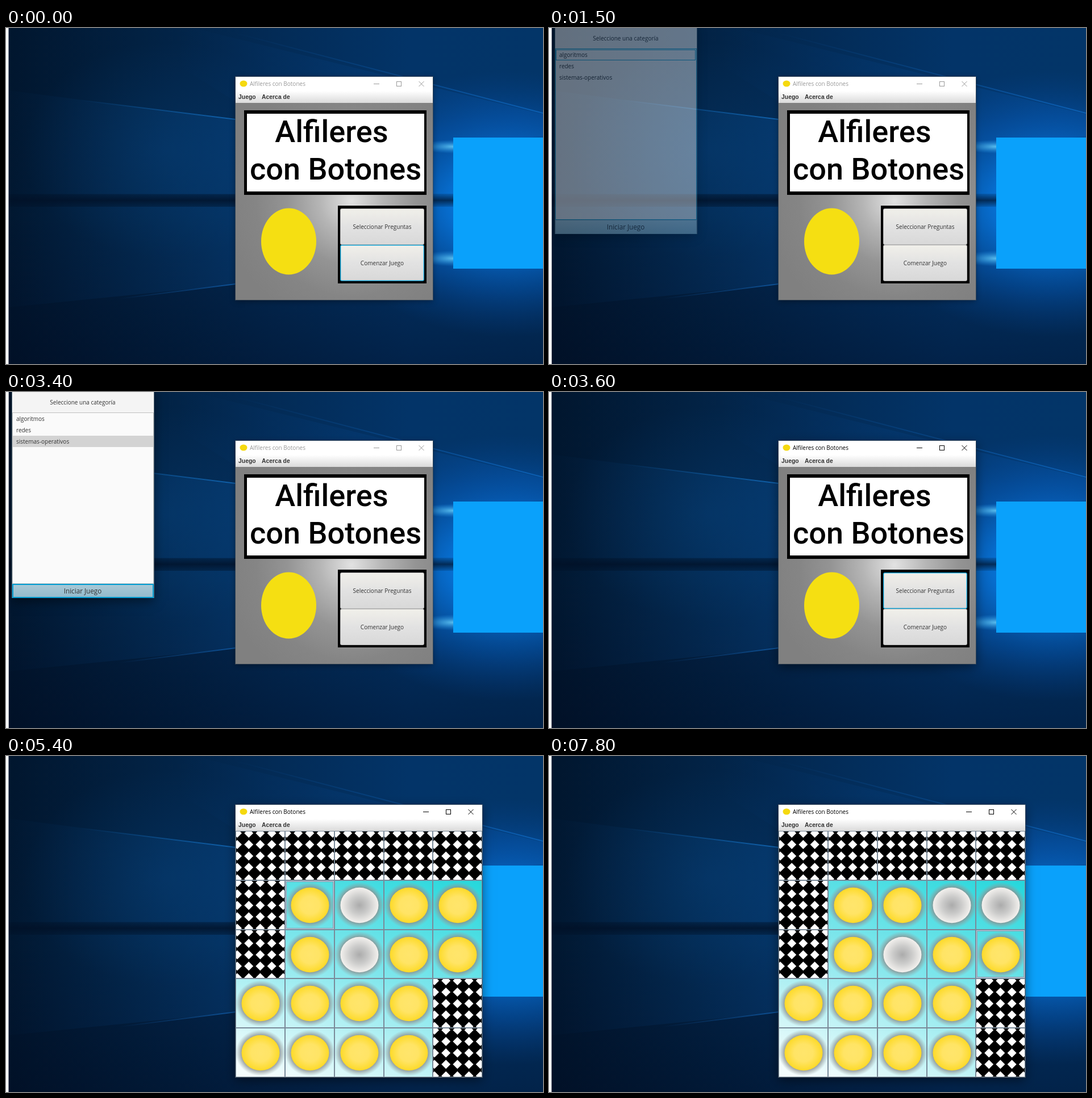
An HTML page with a canvas that plays this animation: 945 px wide and 592 px high, repeating every 8 s.

```html
<!DOCTYPE html>
<html lang="es">
<head>
<meta charset="utf-8">
<title>Alfileres con Botones</title>
<style>
html, body { margin: 0; width: 945px; height: 592px; overflow: hidden; background: #fff; }
canvas { display: block; }
</style>
</head>
<body>
<canvas id="stage" width="945" height="592"></canvas>
<script>
const W = 945, H = 592, LOOP = 8000;
const UI = '"Open Sans", "Noto Sans", sans-serif';
const MENU = '"Liberation Sans", Arial, sans-serif';
const BIG = 'Roboto, Inter, sans-serif';
const NAME = ['Alfileres', 'con Botones'];
const XS = [404, 491, 578, 665, 751, 838];
const YS = [132, 219, 306, 392, 479, 566];
const BOARD = ['#####', '#oooo', '#oooo', 'oo.o#', 'oooo#'];
const BORDER = 'rgba(70,80,90,.7)';

// [time, row, col] of the cell under the pointer
const HOVER = [[4500, 3, 2], [5000, 1, 2], [5200, 0, 1], [5400, 1, 1], [6400, 1, 2],
  [6500, 2, 2], [7000, 2, 3], [7200, 1, 4], [7800, 2, 4]];
// [time, from, over, to]
const MOVES = [[5100, [1, 2], [2, 2], [3, 2]], [7500, [1, 4], [1, 3], [1, 2]]];

const ctx = document.getElementById('stage').getContext('2d');
let g = ctx;

function rect(x, y, w, h, fill) {
  g.fillStyle = fill;
  g.fillRect(x, y, w, h);
}

function frame(x, y, w, h, color, lw = 1) {
  g.strokeStyle = color;
  g.lineWidth = lw;
  g.strokeRect(x + lw / 2, y + lw / 2, w - lw, h - lw);
}

function poly(points, fill) {
  g.beginPath();
  points.forEach(p => g.lineTo(...p));
  g.closePath();
  g.fillStyle = fill;
  g.fill();
}

function line(x1, y1, x2, y2, color, lw = 1) {
  g.beginPath();
  g.moveTo(x1, y1);
  g.lineTo(x2, y2);
  g.strokeStyle = color;
  g.lineWidth = lw;
  g.stroke();
}

function ellipse(x, y, rx, ry, fill) {
  g.beginPath();
  g.ellipse(x, y, rx, ry, 0, 0, Math.PI * 2);
  g.fillStyle = fill;
  g.fill();
}

function text(s, x, y, font, color, align = 'left') {
  g.font = font;
  g.fillStyle = color;
  g.textAlign = align;
  g.fillText(s, x, y);
}

function stops(grad, colors) {
  colors.forEach((c, i) => grad.addColorStop(i / (colors.length - 1), c));
  return grad;
}
const linear = (x1, y1, x2, y2, ...colors) => stops(g.createLinearGradient(x1, y1, x2, y2), colors);
const radial = (x, y, r, ...colors) => stops(g.createRadialGradient(x, y, 0, x, y, r), colors);

function glow(x, y, rx, ry, ...colors) {
  g.save();
  g.translate(x, y);
  g.scale(1, ry / rx);
  ellipse(0, 0, rx, rx, radial(0, 0, rx, ...colors));
  g.restore();
}

function layer(w, h, draw) {
  const c = document.createElement('canvas');
  c.width = w;
  c.height = h;
  const prev = g;
  g = c.getContext('2d');
  draw();
  g = prev;
  return c;
}

function drawDesktop() {
  rect(0, 0, W, H, linear(0, 0, W, 0, '#01162e', '#022142', '#032b56', '#033468', '#033568'));
  rect(0, 0, W, H, linear(0, 330, 0, H, 'rgba(0,8,28,0)', 'rgba(0,8,28,.4)'));
  glow(280, 215, 250, 190, 'rgba(8,70,130,.3)', 'rgba(8,70,130,0)');
  glow(885, 310, 330, 235, 'rgba(10,145,255,1)', 'rgba(8,125,235,.75)', 'rgba(5,95,195,.4)', 'rgba(4,70,150,0)');
  // light beams
  poly([[5, 110], [404, 162], [404, 293], [5, 293]],
    linear(5, 0, 404, 0, 'rgba(10,80,150,.02)', 'rgba(10,90,170,.25)'));
  poly([[5, 315], [404, 315], [404, 452], [5, 492]],
    linear(5, 0, 404, 0, 'rgba(10,80,150,.02)', 'rgba(10,90,170,.22)'));
  poly([[330, 0], [945, 152], [945, 190], [787, 210], [404, 130], [200, 0]],
    linear(300, 0, 900, 0, 'rgba(10,90,180,0)', 'rgba(10,100,200,.2)'));
  line(130, 127, 404, 161, linear(130, 0, 404, 0, 'rgba(20,115,200,0)', 'rgba(20,115,200,.75)'), 2);
  line(200, 477, 404, 451, linear(200, 0, 404, 0, 'rgba(20,105,190,0)', 'rgba(20,105,190,.6)'), 2);
  line(400, 8, 945, 150, linear(400, 0, 945, 0, 'rgba(15,105,200,0)', 'rgba(20,125,225,.5)'), 2);
  glow(787, 209, 60, 12, 'rgba(110,215,255,.8)', 'rgba(40,160,245,0)');
  glow(787, 406, 60, 14, 'rgba(110,215,255,.8)', 'rgba(40,160,245,0)');
  rect(0, 292, 787, 23, linear(0, 291, 0, 316, 'rgba(1,16,38,.1)', 'rgba(1,16,38,.7)', 'rgba(1,16,38,.1)'));
  rect(787, 193, 158, 231, '#0aa1fb');
  rect(0, 0, 4.5, H, '#fff');
}

function shadowed(x, y, w, h, active) {
  g.save();
  g.shadowColor = active ? 'rgba(0,0,0,.5)' : 'rgba(0,0,0,.4)';
  g.shadowBlur = active ? 18 : 10;
  g.shadowOffsetY = active ? 5 : 2;
  rect(x, y, w, h, '#fff');
  g.restore();
}

function drawWindow(right, bottom, active) {
  const w = right - 404, ink = active ? '#000' : '#999';
  shadowed(404, 86, w, bottom - 86, active);
  ellipse(418, 98, 6.5, 5.5, '#f5d90f');
  text(NAME.join(' '), 429, 102, '10px ' + UI, ink);
  const min = right - 99, max = right - 60, x = right - 20;
  line(min - 5, 98.5, min + 5, 98.5, ink);
  frame(max - 4, 94, 9, 9, ink);
  line(x - 4.5, 94, x + 4.5, 103, ink);
  line(x + 4.5, 94, x - 4.5, 103, ink);
  rect(404, 111, w, 21, linear(0, 111, 0, 132, '#fff', '#dadada'));
  text('Juego', 409, 125, 'bold 10.4px ' + MENU, '#333');
  text('Acerca de', 450, 125, 'bold 10.4px ' + MENU, '#333');
}

const FILLS = {
  normal: ['#f1f0ea', '#e2e2e2', '#d8d8d8'],
  hover: ['#f8f8f6', '#ececec', '#e2e2e2'],
  armed: ['#d8d8d8', '#d2d2d2', '#c6c6c6']
};

function button(label, y, h, state, focus) {
  g.beginPath();
  g.roundRect(588, y, 148, h, 3);
  g.fillStyle = focus ? '#039ed3' : '#b5b5b5';
  g.fill();
  g.beginPath();
  g.roundRect(589, y + 1, 146, h - 2, 2);
  g.fillStyle = linear(0, y, 0, y + h, ...FILLS[state]);
  g.fill();
  if (focus) frame(589, y + 1, 146, h - 2, 'rgba(3,158,211,.35)');
  text(label, 662, y + h / 2 + 4, '10px ' + UI, '#333', 'center');
}

function drawMenu(t, active) {
  drawWindow(751, 479, active);
  rect(404, 132, 347, 347, radial(608, 305, 225, '#e2e2e2', '#b5b5b5', '#949494', '#858585', '#808080'));
  rect(419, 145, 321, 149, '#000');
  rect(424, 151, 312, 137, '#fff');
  text(NAME[0], 573, 201, '500 54px ' + BIG, '#000', 'center');
  text(NAME[1], 580, 267, '500 54px ' + BIG, '#000', 'center');
  ellipse(497.5, 376, 48.5, 58.5, '#f5df12');
  rect(584, 313, 156, 137, '#000');

  const top = t >= 600 && t < 1400 ? 'hover' : t >= 1400 && t < 1500 ? 'armed' : 'normal';
  const low = t >= 4400 ? 'armed' : t >= 4000 ? 'hover' : 'normal';
  const topFocus = t >= 1400 && t < 1500 || t >= 3500 && t < 4400;
  button('Seleccionar Preguntas', 318, 64, top, topFocus);
  button('Comenzar Juego', 382, 64, low, t < 1400 || t >= 4400);
  frame(403, 85, 349, 395, BORDER);
}

function drawDialog(t) {
  const inList = t < 3400;
  shadowed(11, -10, 249, 373, true);
  rect(11, 0, 249, 37, '#f4f4f4');
  text('Seleccione una categoría', 135, 22, '10px ' + UI, '#333', 'center');
  rect(11, 37, 249, 301, '#fafafa');
  frame(11, 36, 249, 302, inList ? '#1aa3cf' : '#c0c0c0');
  if (t < 2400) frame(12, 38, 246, 19, '#1aa3cf');
  else rect(12, 77, 247, 20, inList ? '#0096c9' : '#d3d3d3');
  ['algoritmos', 'redes', 'sistemas-operativos'].forEach((s, i) => {
    const lit = i === 2 && t >= 2400 && inList;
    text(s, 18, 51 + 20 * i, '10px ' + UI, lit ? '#fff' : '#333');
  });
  const fill = !inList ? ['#a9c9d7', '#92bacb'] : t >= 3000 ? ['#c4e2ee', '#a6cfdf'] : ['#b9dae8', '#99c4d6'];
  rect(11, 338, 249, 25, linear(0, 338, 0, 363, ...fill));
  frame(11, 338, 249, 25, inList ? '#8ab3c4' : '#039ed3', inList ? 1 : 2);
  text('Iniciar Juego', 135, 355, '11.7px ' + UI, '#333', 'center');
  line(10.5, 0, 10.5, 363, '#5c6f7c');
  line(260.5, 0, 260.5, 363, '#5c6f7c');
}

function diamonds(x, y, w, h) {
  rect(x, y, w, h, '#000');
  g.save();
  g.beginPath();
  g.rect(x, y, w, h);
  g.clip();
  for (let i = 0; i < 5; i++) {
    for (let j = 0; j < 5; j++) {
      const cx = x + 3 + 20.2 * i, cy = y + 4 + 20.1 * j, r = 8;
      poly([[cx - r, cy], [cx, cy - r], [cx + r, cy], [cx, cy + r]], '#fff');
    }
  }
  g.restore();
}

function coin(x, y, gold) {
  g.save();
  g.translate(x, y);
  g.scale(1, .93);
  const halo = g.createRadialGradient(0, 0, 31, 0, 0, 44);
  halo.addColorStop(0, 'rgba(135,135,135,.95)');
  halo.addColorStop(.3, 'rgba(140,145,145,.7)');
  halo.addColorStop(1, 'rgba(150,160,160,0)');
  ellipse(0, 0, 44, 44, halo);
  ellipse(0, 0, 33.5, 33.5, gold
    ? radial(0, 0, 33.5, '#ffe56c', '#ffe465', '#fdda28')
    : radial(0, 0, 33.5, '#ababab', '#cbcbca', '#f3f1ee'));
  g.restore();
}

function drawBoard(t) {
  drawWindow(838, 566, true);
  const cells = BOARD.map(r => [...r]);
  for (const [at, from, over, to] of MOVES) {
    if (t < at) continue;
    cells[from[0]][from[1]] = '.';
    cells[over[0]][over[1]] = '.';
    cells[to[0]][to[1]] = 'o';
  }
  rect(404, 132, 434, 434, linear(700, 150, 525, 590, '#1fd6da', '#80e6ec', '#f4fdfd'));
  const [, hr, hc] = HOVER.filter(h => t >= h[0]).pop();
  for (let r = 0; r < 5; r++) {
    for (let c = 0; c < 5; c++) {
      const x = XS[c], y = YS[r], w = XS[c + 1] - x, h = YS[r + 1] - y;
      const over = r === hr && c === hc;
      if (cells[r][c] === '#') diamonds(x, y, w, h);
      else {
        if (over && t >= 5900 && t < 6000) rect(x, y, w, h, 'rgba(110,140,160,.35)');
        coin(x + 44, y + 44, cells[r][c] === 'o');
      }
      frame(x, y, w, h, '#7a8a99');
      if (over) {
        frame(x + 1, y + 1, w - 2, h - 2, '#b8cfe5', 2);
        frame(x + 2, y + 2, w - 4, h - 4, '#8d9dab');
      }
    }
  }
  frame(403, 85, 436, 482, BORDER);
}

const desktop = layer(W, H, drawDesktop);

function dialogAlpha(t) {
  if (t < 1500 || t >= 3600) return 0;
  if (t < 1600) return .4;
  if (t < 1700) return .8;
  return t < 3500 ? 1 : .45;
}

function draw(t) {
  g.drawImage(desktop, 0, 0);
  if (t >= 4500) return drawBoard(t);
  const alpha = dialogAlpha(t);
  if (alpha) {
    const pane = layer(300, 400, () => drawDialog(t));
    g.globalAlpha = alpha;
    g.drawImage(pane, 0, 0);
    g.globalAlpha = 1;
    rect(0, 0, 4.5, H, '#fff');
  }
  drawMenu(t, t >= 1400 && t < 1500 || t >= 3500);
}

let last = -1;
function tick() {
  const t = Math.floor(performance.now() % LOOP / 100) * 100;
  if (t !== last) draw(last = t);
  requestAnimationFrame(tick);
}
tick();
</script>
</body>
</html>
```
